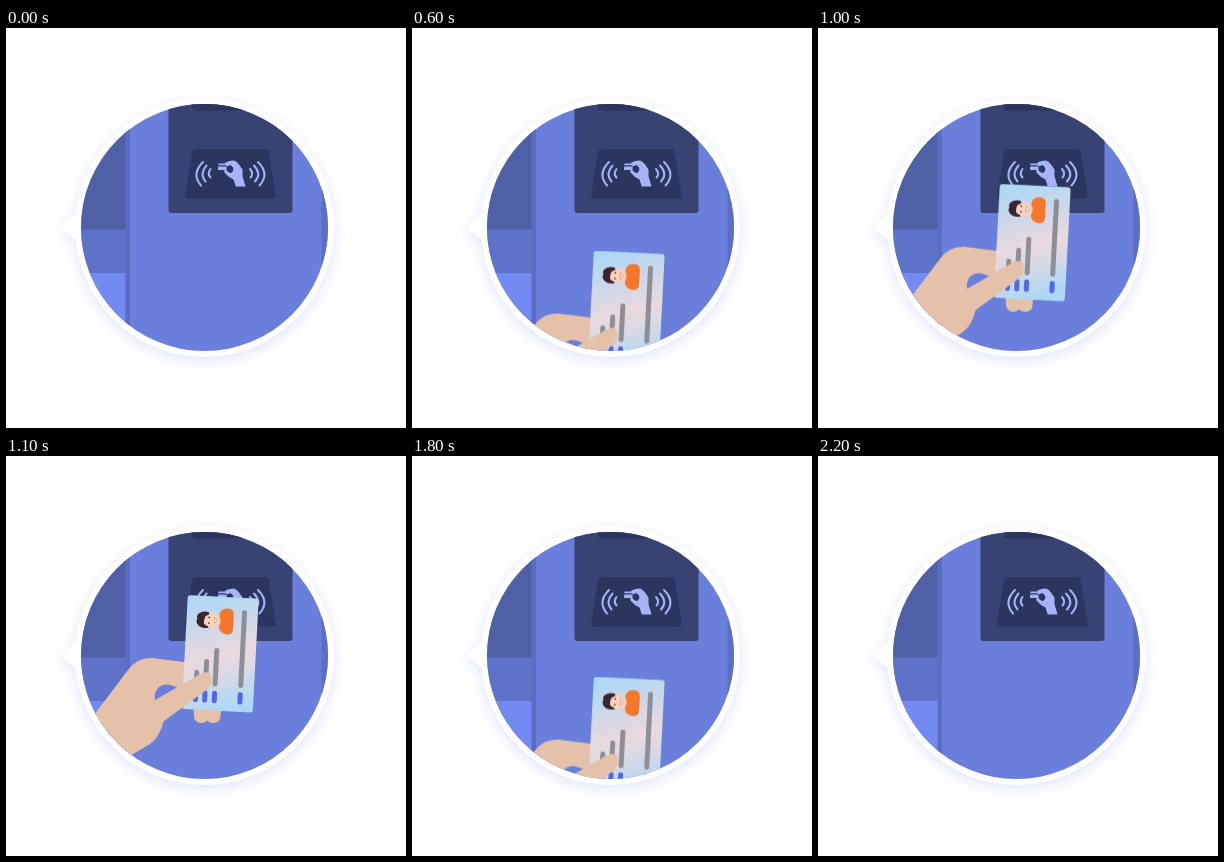
Write an HTML page that moves like this. It is 400x400 px and loops after 2.7 s.

```html
<!DOCTYPE html>
<html lang="en">
<head>
<meta charset="utf-8">
<title>Card reader</title>
<style>
  html, body { margin: 0; width: 100%; height: 100%; overflow: hidden; background: #fff; }
  svg { display: block; width: 100%; height: 100%; }
  .bubble { filter: drop-shadow(0 4px 7px rgba(105, 126, 240, .2)); }
  .waves { fill: none; stroke: #a6b4f7; stroke-width: 2; stroke-linecap: round; }
  .skin { fill: #e6c1a9; }
</style>
</head>
<body>
<svg viewBox="0 0 400 400">
  <defs>
    <clipPath id="lens"><circle cx="198.5" cy="199.5" r="123.5"/></clipPath>
    <linearGradient id="sheen" x1=".4" y1="0" x2=".6" y2="1">
      <stop offset="0" stop-color="#afd8f4"/>
      <stop offset=".5" stop-color="#e9d9df"/>
      <stop offset=".63" stop-color="#e2d9e2"/>
      <stop offset="1" stop-color="#abd8f6"/>
    </linearGradient>
  </defs>

  <g class="bubble" fill="#fff">
    <circle cx="198.5" cy="199.5" r="129.5"/>
    <path d="M73 183 L57 196.500 Q54 199 57 201.500 L73 215 Z"/>
  </g>

  <g clip-path="url(#lens)">
    <!-- machine -->
    <rect x="70" y="70" width="260" height="260" fill="#697fdb"/>
    <rect x="70" y="70" width="50" height="132" fill="#5060a7"/>
    <rect x="70" y="201.500" width="50" height="44" fill="#5f72c9"/>
    <rect x="70" y="245" width="50" height="85" fill="#738af2"/>
    <rect x="119.500" y="70" width="4.500" height="260" fill="#5b6dc0"/>
    <rect x="315.500" y="70" width="10" height="260" fill="#5d6fc3"/>
    <rect x="162.500" y="60" width="124" height="125" rx="3" fill="#384374"/>
    <rect x="186" y="60" width="77" height="22.500" rx="4" fill="#2c355d"/>
    <path d="M190 121 H259 Q262 121 262.700 124 L269.700 167 Q270 170.500 267 170.500 H182 Q179 170.500 179.300 167 L186 124 Q186.700 121 190 121 Z" fill="#2c355d"/>

    <!-- tap symbol -->
    <g class="waves">
      <path d="M197 134 Q185 146 195 157.500 M200.500 137.500 Q193 146 199.500 153.500 M204.500 141 Q201 145.500 204.500 149.500"/>
      <path d="M252 134 Q264 146 253.500 157.500 M248 137.500 Q256 146 249 153.500 M244 141 Q248 145.500 244.500 149.500"/>
    </g>
    <g fill="#a6b4f7">
      <path d="M212.500 135.500 H220.500 V137.300 H212.300 Z M212.200 138.500 H220.500 V142 H212 Z"/>
      <path d="M219 135 Q222 132.500 228 132.500 Q231 133.500 233 136.500 L236.500 141.500 V148 L239.500 158.500 H229.800 L227.500 151.500 Q222 149 218.500 144.500 Q217.500 142 220 141.500 Q222.500 145.500 225 145 Q228 143 227 139.500 L224.500 137 L220.500 138.500 Z"/>
    </g>

    <!-- hand with card -->
    <g id="hand">
      <g class="skin">
        <path d="M60 296 L122 214 Q131 201.500 146 202 L178 206 L195 210 V232 H172 Q159 225 152 232 Q148 237 149 244 L158 264 Q154 281 144 288 L122 301 L80 340 Z"/>
        <rect x="187.500" y="236" width="14.500" height="31" rx="6.500" transform="rotate(-3 195 250)"/>
        <rect x="201" y="236" width="14.500" height="31" rx="6.500" transform="rotate(6 208 250)"/>
      </g>
      <g transform="translate(181.800 139) rotate(3)">
        <rect width="71" height="114" rx="3" fill="url(#sheen)"/>
        <g id="lines"></g>
        <!-- portrait lying on its side -->
        <g transform="translate(9 11)">
          <path d="M19 9.500 L25 9 V18 L19 17.500 Z" fill="#f3c4a8"/>
          <path d="M23.500 8 Q24 1 31 .5 Q37.500 0 38 6 V20 Q38 26.500 32 26.500 Q25 26 23.500 19 Q27 13.500 23.500 8 Z" fill="#f4772a"/>
          <ellipse cx="15" cy="13" rx="9" ry="7.500" fill="#f9d2bb"/>
          <path d="M13 5 Q7 3.500 3 7 Q.5 9 1.800 12 Q0 15 2.500 18 Q6 22.500 13.500 20.500 L12.500 18.800 Q9.500 18.500 8.500 16 Q8.500 11 10 9 L13.500 7 Z" fill="#3a2430"/>
          <g fill="#3a2430">
            <circle cx="13.500" cy="10.200" r=".8"/>
            <circle cx="13.500" cy="16" r=".8"/>
          </g>
          <path d="M18.800 10 Q24 13 18.800 16 Z" fill="#fff" stroke="#c9604f" stroke-width=".5"/>
        </g>
      </g>
      <path class="skin" d="M149 244 L194 218.300 Q202 214 205 219 Q207.500 227 201 233.500 L158 265 L140 270 Z"/>
    </g>
  </g>
</svg>
<script>
  const LOOP = 2700;

  // Text rows on the card: centre x and top of each grey bar
  const rows = [[57.6, 12.2], [31.9, 51.4], [22.3, 63], [13, 74.5]];
  const bar = (x, top, bottom, color) =>
    `<rect x="${x - 2.5}" y="${top}" width="5" height="${bottom - top}" rx="2.2" fill="${color}"/>`;
  document.getElementById('lines').innerHTML = rows
    .map(([x, top]) => bar(x, top, 90, '#8e8e97') + bar(x, 94.3, 106.6, '#5069e8'))
    .join('');

  // Raise in 11 ticks, hold on the reader, drop in 7 ticks
  const poses = [
    [0, 183.7, 'steps(11, end)'],
    [1100, 0, 'linear'],
    [1500, 0, 'steps(7, end)'],
    [2200, 190.2, 'linear'],
    [LOOP, 190.2, 'linear'],
  ];
  document.getElementById('hand').animate(
    poses.map(([time, y, easing]) => ({ offset: time / LOOP, transform: `translateY(${y}px)`, easing })),
    { duration: LOOP, iterations: Infinity }
  );
</script>
</body>
</html>
```
